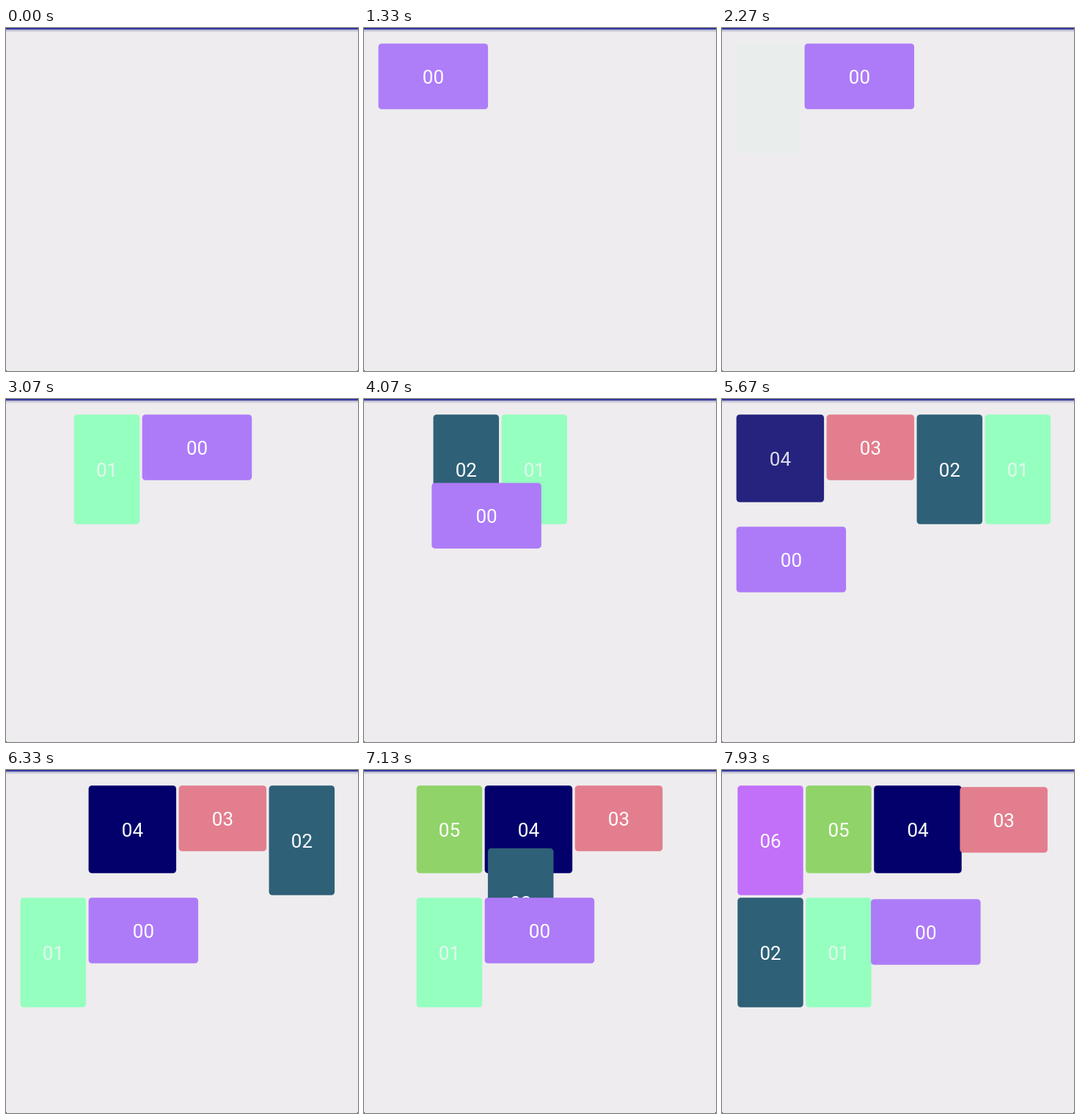
Write an HTML page with a canvas that moves like this. It is 480 px wide and 468 px high and loops after 8000 ms.

```html
<!DOCTYPE html>
<html lang="en">
<head>
<meta charset="utf-8">
<title>Flex cards</title>
<style>
html, body { margin: 0; width: 100%; height: 100%; overflow: hidden; background: #eeecee; }
canvas { display: block; }
</style>
</head>
<body>
<canvas id="stage" width="480" height="468"></canvas>
<script>
const ctx = document.getElementById('stage').getContext('2d');
const LOOP = 8000, MOVE = 500, FADE = 500;
const LEFT = 19.6, TOP = 21.2, RIGHT = 461, GAP = 3.5;

// Each card is inserted in front of all earlier ones at its start time.
const cards = [
  { w: 150, h: 90, color: '#ad7bf8', start: 370 },
  { w: 90, h: 150, color: '#95ffbf', start: 1694, ink: '#e4f8ee' },
  { w: 90, h: 150, color: '#2e6077', start: 2724 },
  { w: 120, h: 90, color: '#e37e8e', start: 3786 },
  { w: 120, h: 120, color: '#03006c', start: 4798 },
  { w: 90, h: 120, color: '#90d369', start: 5830 },
  { w: 90, h: 150, color: '#c26ffa', start: 6862 },
  { w: 120, h: 120, color: '#5f9ea0', start: 7894 }
];

const clamp = v => Math.max(0, Math.min(1, v));
const ease = v => 0.5 - 0.5 * Math.cos(Math.PI * clamp(v));

// Wrapping rows, newest card first.
function layout(newest) {
  const places = [];
  let x = LEFT, y = TOP, rowHeight = 0;
  for (let i = newest; i >= 0; i--) {
    const { w, h } = cards[i];
    if (x + w > RIGHT) {
      x = LEFT;
      y += rowHeight + 3;
      rowHeight = 0;
    }
    places[i] = { x, y };
    x += w + 3;
    rowHeight = Math.max(rowHeight, h);
  }
  return places;
}
const layouts = cards.map((card, i) => layout(i));

function drawCard(i, x, y, alpha) {
  const { w, h, color, ink = '#fff' } = cards[i];
  ctx.globalAlpha = alpha;
  ctx.fillStyle = color;
  ctx.beginPath();
  ctx.roundRect(x, y, w - 0.5, h - 0.5, 4.5);
  ctx.fill();
  ctx.fillStyle = ink;
  ctx.fillText('0' + i, x + w / 2 - 0.2, y + h / 2 + 9.4);
  ctx.globalAlpha = 1;
}

function drawBackground() {
  ctx.fillStyle = '#eeecee';
  ctx.fillRect(0, 0, 480, 468);
  const shadow = ctx.createLinearGradient(0, 2, 0, 6);
  shadow.addColorStop(0, '#aaaac4');
  shadow.addColorStop(1, '#eeecee');
  ctx.fillStyle = shadow;
  ctx.fillRect(0, 2, 480, 4);
  ctx.fillStyle = '#3538a2';
  ctx.fillRect(0, 0, 480, 2);
  ctx.fillStyle = '#333';
  for (const x of [0, 479]) ctx.fillRect(x, 467, 1, 1);
}

function draw(now) {
  const t = now % LOOP;
  drawBackground();
  ctx.font = '26px Roboto, sans-serif';
  ctx.textAlign = 'center';
  const newest = cards.filter(card => t >= card.start).length - 1;
  if (newest >= 0) {
    const elapsed = t - cards[newest].start;
    const p = ease(elapsed / MOVE);
    const to = layouts[newest];
    const from = newest ? layouts[newest - 1] : to;
    const alpha = ease((elapsed - MOVE) / FADE);
    if (alpha > 0) drawCard(newest, to[newest].x, to[newest].y, alpha);
    for (let i = newest - 1; i >= 0; i--) {
      const a = from[i], b = to[i];
      drawCard(i, a.x + (b.x - a.x) * p, a.y + (b.y - a.y) * p, 1);
    }
  }
  requestAnimationFrame(() => draw(performance.now()));
}
draw(0);
</script>
</body>
</html>
```
